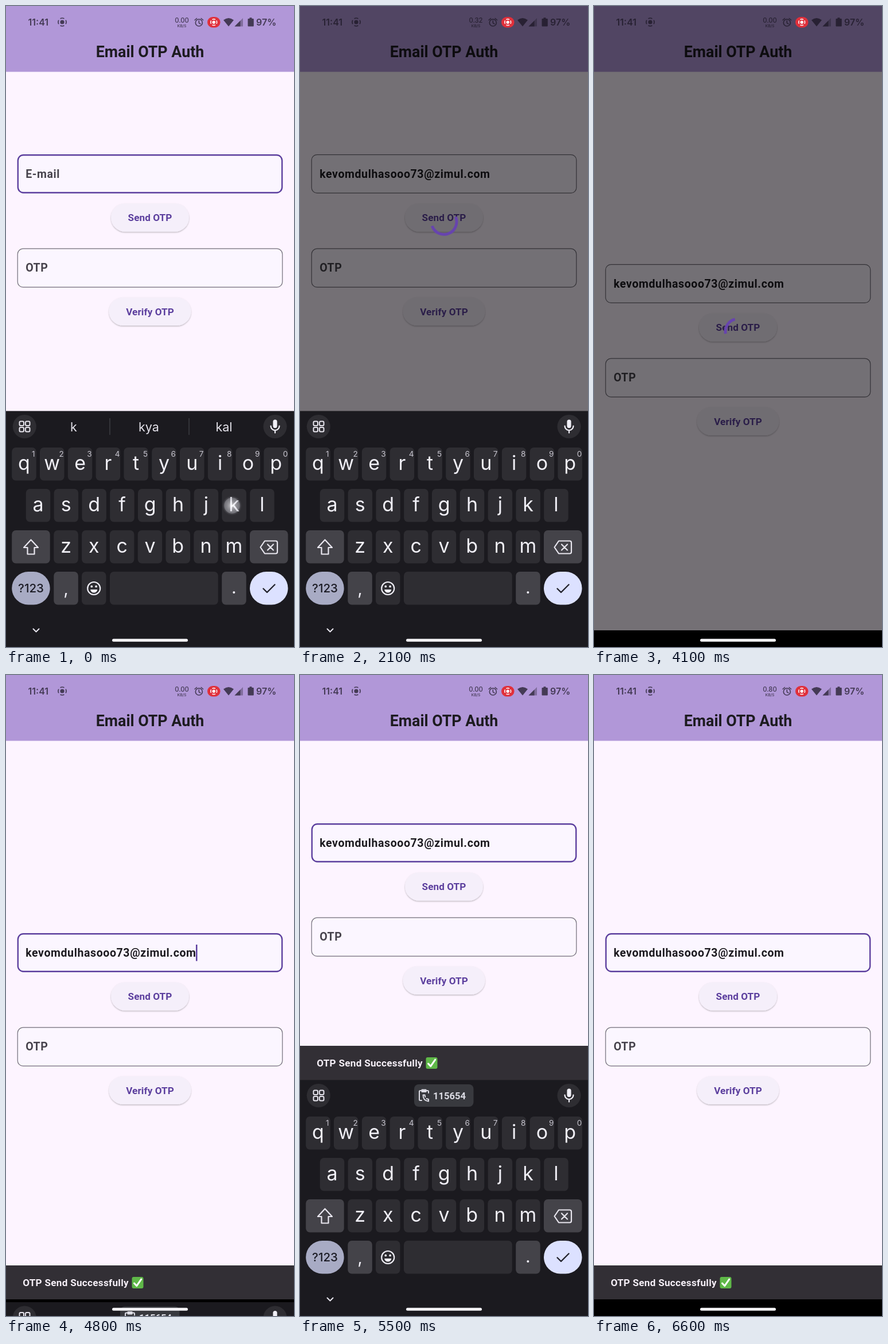
Recreate the animation shown at these times as an HTML page. Size 502x1115 px, loop 6700 ms.

```html
<!DOCTYPE html>
<html lang="en">
<head>
<meta charset="utf-8">
<title>Email OTP Auth</title>
<style>
  html, body { margin: 0; width: 100%; height: 100%; overflow: hidden; background: #000; }
  svg#stage { display: block; width: 100vw; height: 100vh; }
  text { font-family: Roboto, sans-serif; font-weight: 700; white-space: pre; }
  .mid { text-anchor: middle; }
  .input { font-size: 19.5px; letter-spacing: .61px; fill: #1d1b20; }
  .label { fill: #47434c; }
  .button { font-size: 17.1px; letter-spacing: .12px; fill: #5c3f9e; }
  .kb text { font-family: Inter, sans-serif; font-weight: 400; fill: #f0eff6; }
  .kb .key { font-size: 34px; }
  .kb .hint { font-size: 13.5px; fill: #c8c6d0; }
  .kb .word { font-size: 21.5px; fill: #e4e2ea; }
  .kb .chip { font-family: Roboto, sans-serif; font-weight: 600; fill: #dcdce4; }
  .status text { font-family: Inter, sans-serif; font-weight: 600; font-size: 16px; }
  .line { fill: none; stroke-linecap: round; stroke-linejoin: round; }
</style>
</head>
<body>
<svg id="stage" viewBox="0 0 502 1115" preserveAspectRatio="none">
  <defs>
    <radialGradient id="dot">
      <stop offset="0" stop-color="#fff" stop-opacity=".8"/>
      <stop offset=".4" stop-color="#e8e8ee" stop-opacity=".55"/>
      <stop offset=".78" stop-color="#b4b4bc" stop-opacity=".5"/>
      <stop offset=".84" stop-color="#888890" stop-opacity=".25"/>
      <stop offset="1" stop-color="#888890" stop-opacity="0"/>
    </radialGradient>
    <filter id="lift" x="-10%" y="-20%" width="120%" height="150%">
      <feDropShadow dx="0" dy="1.3" stdDeviation="1" flood-color="#000" flood-opacity=".28"/>
    </filter>
  </defs>

  <rect width="502" height="1115" fill="#fdf4ff"/>
  <rect width="502" height="114.5" fill="#b197d8"/>
  <text class="mid" x="251" y="89.3" font-size="26.8" fill="#1d1b20">Email OTP Auth</text>

  <g id="form">
    <rect id="emailBox" fill="#fbf6ff"/>
    <text id="email" class="input" x="34.2" y="489.7"></text>
    <rect id="caret" y="469" width="2.5" height="28.5" fill="#5c3f9e"/>
    <rect x="183" y="534.5" width="136" height="49" rx="24.5" fill="#f5effa" filter="url(#lift)"/>
    <text class="button mid" x="251" y="565">Send OTP</text>
    <rect x="20.2" y="613.2" width="461.6" height="67" rx="9.5" fill="#fbf6ff" stroke="#716d78" stroke-width="1.2"/>
    <text class="input label" x="34.2" y="653">OTP</text>
    <rect x="179.5" y="697.8" width="143" height="49" rx="24.5" fill="#f5effa" filter="url(#lift)"/>
    <text class="button mid" x="251" y="728.5">Verify OTP</text>
  </g>

  <g id="snack">
    <rect y="1027" width="502" height="60" fill="#322f35"/>
    <text x="29.3" y="1062.6" font-size="17.1" letter-spacing=".3" fill="#f5eff7">OTP Send Successfully</text>
    <rect x="219.5" y="1047" width="20" height="20" rx="3" fill="#5fb848"/>
    <path class="line" d="M223.5 1058l4.2 4.6 8-11.5" stroke="#fff" stroke-width="3"/>
  </g>

  <g id="dialog">
    <rect width="502" height="1115" fill="#000" fill-opacity=".54"/>
    <circle id="spinner" r="22" pathLength="360" fill="none" stroke="#6744ae" stroke-width="4.9"/>
  </g>

  <rect y="1086" width="502" height="29" fill="#000"/>
  <g id="keyboard" class="kb"></g>
  <rect x="185" y="1100.8" width="132" height="5" rx="2.5" fill="#f4f3f6"/>

  <g class="status" fill="#17131f" stroke="#17131f" stroke-width="0" opacity=".7">
    <text x="38.5" y="34">11:41</text>
    <text x="436" y="34">97%</text>
    <circle cx="98" cy="28" r="3.6"/>
    <circle cx="98" cy="28" r="7" fill="none" stroke-width="1.7" pathLength="80" stroke-dasharray="13 7" stroke-dashoffset="6.5"/>
    <text id="rate" class="mid" x="306.5" y="29.3" style="font-size:11.3px;font-weight:500"></text>
    <text class="mid" x="306.5" y="37.3" style="font-size:6.8px;font-weight:500">KB/S</text>
    <circle cx="336.3" cy="29" r="6" fill="none" stroke-width="1.6"/>
    <path class="line" d="M336.3 25.5v4l2.6 1.6M329 24.5l3.5-3M343.6 24.5l-3.5-3" stroke-width="1.5"/>
    <path d="M379 24.5Q388 17.500 397 24.500L388 35.500Z"/>
    <path d="M413 21v14.500h-14.500Z" opacity=".45"/>
    <path d="M408.500 25.500v10h-10Z"/>
    <path d="M424.500 20.300h4v1.600h2.300q1 0 1 1v11.600q0 1-1 1h-8.300q-1 0-1-1v-11.600q0-1 1-1h2Z"/>
  </g>
  <g>
    <rect x="351" y="19" width="22.500" height="18.500" rx="9.200" fill="#e0303b"/>
    <circle cx="362.200" cy="28.200" r="2.700" fill="#fff"/>
    <circle cx="362.200" cy="28.200" r="5.400" fill="none" stroke="#fff" stroke-width="1.500" pathLength="80" stroke-dasharray="14 6" stroke-dashoffset="7"/>
  </g>
  <circle id="tap" r="17" fill="url(#dot)"/>
</svg>

<script>
const LOOP = 6700;
const ADDRESS = "kevomdulhasooo73@zimul.com";
const KEY_TIMES = [100, 220, 340, 440, 550];
const FILL_TIME = 1200;
const DIALOG_OPEN = 1810, DIALOG_CLOSE = 4320;
const KB_HEIGHT = 411, NAV_HEIGHT = 29;
const PITCH = 48.8, KEY_W = 42.5, KEY_H = 57.5;

// x, y, press and release time
const TAPS = [
  [394, 869, -100, 50], [129, 798, 150, 220], [250, 941, 270, 340],
  [421, 798, 380, 440], [397, 941, 490, 550], [411, 720, 1040, 1170],
  [250, 369, 1560, 1700], [52, 1086, 6230, 6330]
];

const el = id => document.getElementById(id);
const set = (node, attrs) => { for (const k in attrs) node.setAttribute(k, attrs[k]); };
const clamp = x => Math.min(1, Math.max(0, x));
const ramp = (t, start, length) => clamp((t - start) / length);
const within = (t, a, b) => t >= a && t < b;

// cubic-bezier(.4, 0, .2, 1)
function ease(x) {
  let lo = 0, hi = 1;
  for (let i = 0; i < 20; i++) {
    const u = (lo + hi) / 2, v = 1 - u;
    if (1.2 * v * v * u + .6 * v * u * u + u * u * u < x) lo = u; else hi = u;
  }
  return lo * lo * (3 - 2 * lo);
}

const box = (x, y, w, h, r, fill) =>
  `<rect x="${x}" y="${y}" width="${w}" height="${h}" rx="${r}" fill="${fill}"/>`;
const label = (cls, x, y, text, size) =>
  `<text class="mid ${cls}" x="${x}" y="${y}"${size ? ` style="font-size:${size}px"` : ""}>${text}</text>`;
const line = (d, color = "#e8e6ee", width = 2.2) =>
  `<path class="line" d="${d}" stroke="${color}" stroke-width="${width}"/>`;

function keyRow(letters, x0, y, hints = "") {
  return [...letters].map((c, i) => {
    const x = x0 + i * PITCH;
    return box(x, y, KEY_W, KEY_H, 7, "#2e2d32") +
      label("key", x + KEY_W / 2, y + 39, c) +
      (hints ? label("hint", x + 37.5, y + 15.5, hints[i]) : "");
  }).join("");
}

function buildKeyboard() {
  const special = "#444349";
  const tiles = [[23.5, 722.5], [34, 722.5], [23.5, 733], [34, 733]].map(([x, y]) =>
    `<rect x="${x}" y="${y}" width="7.500" height="7.500" rx="2" fill="none" stroke="#e8e6ee" stroke-width="2"/>`).join("");
  el("keyboard").innerHTML =
    box(0, 704.5, 502, 412, 0, "#1b1a1f") +
    `<circle cx="32.300" cy="731.500" r="20.500" fill="#2e2d32"/>` + tiles +
    `<g id="strip"></g>` +
    `<circle cx="469" cy="731.500" r="20.500" fill="#2e2d32"/>` +
    box(465.4, 719.5, 7.2, 14.5, 3.6, "#f0eff6") +
    line("M461.500 730.500a7.500 7.500 0 0 0 15 0M469 738.500v4", "#f0eff6") +
    keyRow("qwertyuiop", 10.2, 768, "1234567890") +
    keyRow("asdfghjkl", 34.8, 840) +
    box(10.2, 912, 66.500, KEY_H, 7, special) +
    line("M43.500 928.500L56 942h-6.500v11.500h-12V942H31Z") +
    keyRow("zxcvbnm", 83.300, 912) +
    box(425, 912, 66.500, KEY_H, 7, special) +
    line("M451 930.500h19q3 0 3 3v16q0 3-3 3h-19l-7.500-11ZM456 936.500l10 10M466 936.500l-10 10") +
    box(10.2, 984, 66.500, KEY_H, 28.7, "#a8abc4") +
    `<text class="mid" x="43.500" y="1020" style="font-size:20.500px;font-weight:500;fill:#1b1b24">?123</text>` +
    box(83.300, 984, KEY_W, KEY_H, 7, special) + label("", 104.500, 1024, ",", 30) +
    box(132, 984, KEY_W, KEY_H, 7, "#2e2d32") +
    `<circle cx="153.200" cy="1013" r="11" fill="none" stroke="#f0eff6" stroke-width="2.200"/>
     <circle cx="149.300" cy="1009.700" r="1.900" fill="#f0eff6"/><circle cx="157.100" cy="1009.700" r="1.900" fill="#f0eff6"/>
     <path d="M147.200 1015h12a6 5.500 0 0 1-12 0Z" fill="#f0eff6"/>` +
    box(181, 984, 188.800, KEY_H, 7, "#2e2d32") +
    box(376.200, 984, KEY_W, KEY_H, 7, special) + label("", 397.400, 1022, ".", 30) +
    box(425, 984, 66.500, KEY_H, 28.7, "#dce1ff") +
    line("M448.500 1013.500l6.500 6.500 13.500-13.500", "#22222c", 2.300) +
    line("M47.500 1083.500l5 5 5-5", "#e8e6ee", 2);
}

const divider = x => box(x - .6, 717, 1.2, 29, 0, "#45444a");
const words = list => list.map((w, i) => label("word", 118 + i * 131, 739.5, w)).join("");

function stripFor(t, typed) {
  if (t >= DIALOG_CLOSE) {
    return box(199, 712, 103.500, 39, 8, "#38393e") +
      line("M212 740h-2.500q-1.500 0-1.500-1.500v-14q0-1.500 1.500-1.500h13q1.500 0 1.500 1.500v2.500M212.500 725h7v-3.500h-7ZM214.500 730.500q0 10 9.500 11v-3.500l-3.500-1M214.500 730.500h3l.8 3.500", "#dcdce4", 2) +
      label("chip", 260.500, 737.5, "115654", 16.500);
  }
  if (t >= FILL_TIME) return "";
  if (typed.length < 2) return divider(181) + divider(319) + words(["k", "kya", "kal"]);
  return divider(181) + words([typed, "kevoms"]) +
    box(319, 709, 124, 45, 9, "#35363b") +
    `<text class="mid chip" x="378.500" y="725.300" style="font-size:16px;letter-spacing:-.2px">kevom…ooo73</text>` +
    label("", 380.500, 747, "@zimul.com", 15);
}

function drawSpinner(t, y) {
  const age = Math.max(0, t - DIALOG_OPEN);
  const phase = age / 1333 % 1;
  const head = ease(clamp(phase * 2)), tail = ease(clamp(phase * 2 - 1));
  const start = -90 + tail * 270 + age / 2222 % 1 * 360 + phase * 90;
  const sweep = Math.max(.1, 270 * (head - tail));
  set(el("spinner"), {
    transform: `translate(251 ${y}) rotate(${start})`,
    "stroke-dasharray": `${sweep} ${360 - sweep}`
  });
}

function keyboardOpen(t) {
  if (t < 3000) return 1 - ease(ramp(t, 2120, 250));
  return ease(ramp(t, 4760, 285)) - ease(ramp(t, 6390, 200));
}

let lastStrip = null;

function render(t) {
  const visible = KB_HEIGHT * keyboardOpen(t);
  const inset = Math.max(0, visible - NAV_HEIGHT);
  const filled = t >= FILL_TIME;
  const typed = filled ? ADDRESS : ADDRESS.slice(0, KEY_TIMES.filter(k => t >= k).length);
  const focused = !within(t, DIALOG_OPEN, DIALOG_CLOSE);

  set(el("form"), { transform: `translate(0 ${-inset / 2})` });
  set(el("keyboard"), { transform: `translate(0 ${KB_HEIGHT - visible})`, visibility: visible > .5 ? "visible" : "hidden" });

  const edge = focused ? 1.2 : .6;
  set(el("emailBox"), {
    x: 19.6 + edge, y: 449 + edge, width: 462.800 - 2 * edge, height: 68 - 2 * edge, rx: 9.5,
    stroke: focused ? "#5c3f9e" : "#716d78", "stroke-width": edge * 2
  });

  const email = el("email");
  email.textContent = typed || "E-mail";
  set(email, {
    class: typed ? "input" : "input label",
    "text-decoration": typed && !filled ? "underline" : "none"
  });
  const caretOn = within(t, 100, 1050) || within(t, FILL_TIME, 1700) ||
    within(t, 4700, 5200) || within(t, 5700, 6200);
  set(el("caret"), {
    x: 34.2 + email.getComputedTextLength() - .6,
    visibility: caretOn ? "visible" : "hidden"
  });

  const snack = ease(ramp(t, 4420, 250));
  set(el("snack"), {
    transform: `translate(0 ${-inset + 59 * (1 - snack)})`,
    visibility: snack ? "visible" : "hidden"
  });

  const dim = ramp(t, DIALOG_OPEN, 150) - ramp(t, DIALOG_CLOSE, 150);
  set(el("dialog"), { opacity: dim });
  drawSpinner(t, 566.3 - inset / 2);

  el("rate").textContent = t >= 6200 ? "0.80" : within(t, 500, 3000) ? "0.32" : "0.00";

  const strip = stripFor(t, typed);
  if (strip !== lastStrip) el("strip").innerHTML = lastStrip = strip;

  const tap = TAPS.find(([, , down, up]) => within(t, down, up + 40));
  set(el("tap"), tap
    ? { cx: tap[0], cy: tap[1], opacity: 1 - ramp(t, tap[3], 40) }
    : { opacity: 0 });
}

buildKeyboard();
const begin = performance.now();
function tick() {
  render((performance.now() - begin) % LOOP);
  requestAnimationFrame(tick);
}
tick();
</script>
</body>
</html>
```
